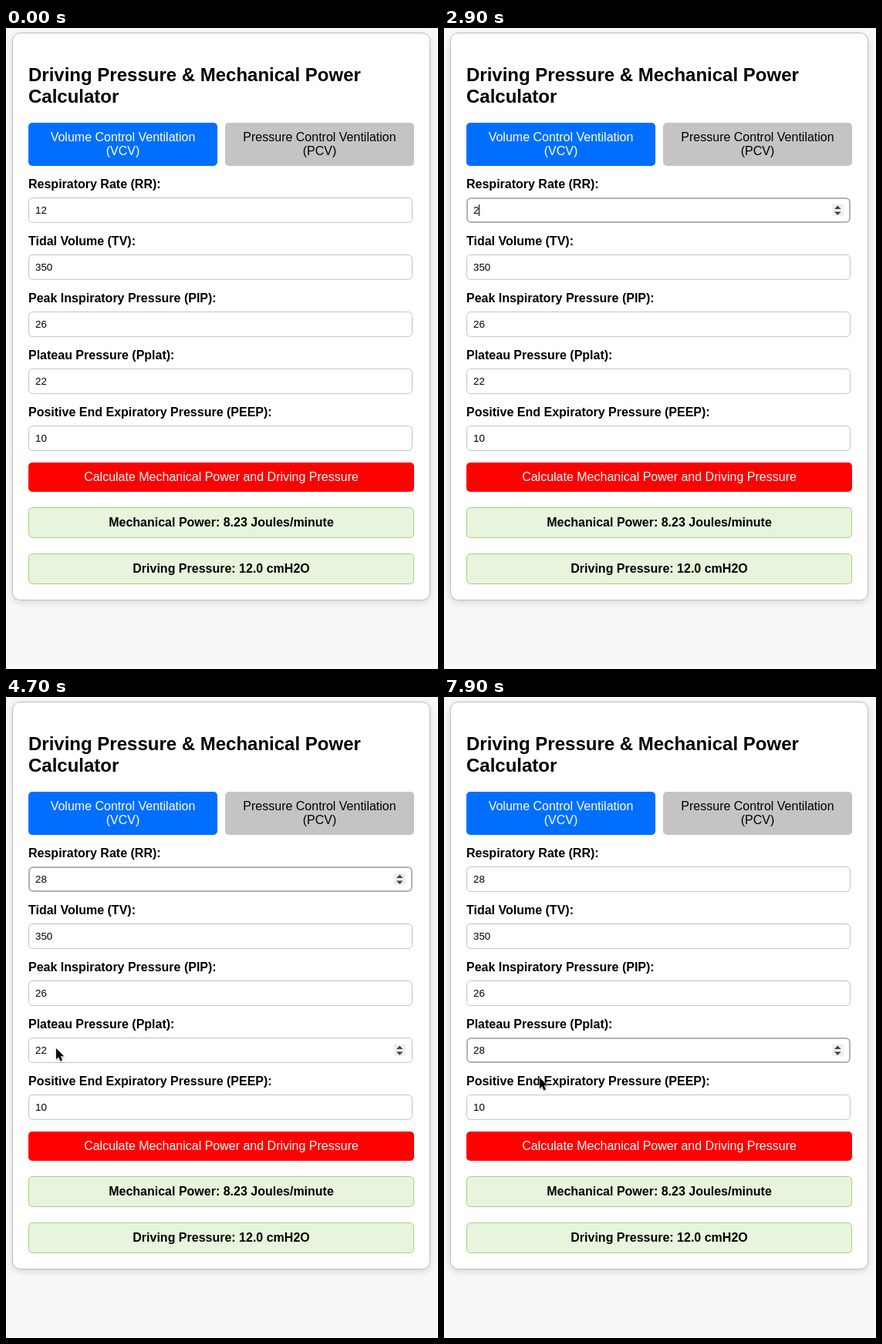
Write an HTML page that moves like this. It is 560 px wide and 832 px high and loops after 8000 ms.

```html
<!DOCTYPE html>
<html lang="en">
<head>
<meta charset="utf-8">
<title>Ventilation calculator</title>
<style>
html, body { margin: 0; width: 100%; height: 100%; overflow: hidden; background: #f8f8f8; }
svg { display: block; width: 560px; height: 832px; font: 16px "Liberation Sans", Arial, sans-serif; }
.card { fill: #fff; stroke: #bdbdbd; filter: drop-shadow(0 3px 4px rgba(0,0,0,.13)); }
.bold { font-weight: bold; }
.title { font-size: 24px; }
.mid { text-anchor: middle; }
.white { fill: #fff; }
.value { font-size: 13.333px; }
.box { fill: #fff; stroke: #c4c4c4; }
.result { fill: #e6f5dc; stroke: #a5cf85; }
.cursor { filter: drop-shadow(0 1px 1px rgba(0,0,0,.3)); }
</style>
</head>
<body>
<svg id="stage" viewBox="0 0 560 832"></svg>
<script>
const LOOP = 8000, STEP = 100;
const stage = document.getElementById('stage');

const text = (x, y, cls, s) => `<text x="${x}" y="${y}" class="${cls}">${s}</text>`;
const rect = (x, y, w, h, attrs) => `<rect x="${x}" y="${y}" width="${w}" height="${h}" rx="5" ${attrs}/>`;

const labels = [
  'Respiratory Rate (RR):', 'Tidal Volume (TV):', 'Peak Inspiratory Pressure (PIP):',
  'Plateau Pressure (Pplat):', 'Positive End Expiratory Pressure (PEEP):'
];
const initial = ['12', '350', '26', '22', '10'];
const RR = 0, PPLAT = 3;
const fieldTop = i => 220 + 74 * i;

// [time, field, value]: focusing and typing; each one restarts the caret blink
const edits = [
  [1500, RR, '12'], [1700, RR, '1'], [2500, RR, ''], [2800, RR, '2'], [3100, RR, '28'],
  [4900, PPLAT, '22'], [5200, PPLAT, '2'], [5400, PPLAT, ''], [5700, PPLAT, '2'], [5950, PPLAT, '28']
];

// Pointer paths: [time, x, y]; the pointer is hidden between paths
const paths = [
  [[1000, 18, 262], [1300, 66, 233], [1700, 66, 233]],
  [[4000, 66, 233], [4200, 66, 233], [4600, 65, 456], [5200, 65, 456]],
  [[7300, 65, 456], [7400, 65, 456], [7900, 124, 494], [8000, 124, 494]]
];

function pointerAt(t) {
  for (const path of paths)
    for (let i = 1; i < path.length; i++) {
      const [t0, x0, y0] = path[i - 1], [t1, x1, y1] = path[i];
      if (t < t0 || t >= t1) continue;
      const p = (t - t0) / (t1 - t0), e = p * p * (3 - 2 * p);
      return [x0 + (x1 - x0) * e, y0 + (y1 - y0) * e];
    }
  return null;
}

function field(i, value, focused, spinner, caret) {
  const y = fieldTop(i);
  let s = focused
    ? rect(30, y + 1, 496, 31, 'fill="#fff" stroke="#b2b2b2" stroke-width="2"')
    : rect(29.5, y + .5, 497, 32, 'class="box"');
  s += text(38, y + 21, 'value', value);
  if (spinner)
    s += `<rect x="503" y="${y + 9}" width="15" height="15" fill="#efefef"/>` +
      `<path d="M506 ${y + 15}l4.3-4.5 4.3 4.5zm0 3.5l4.3 4.5 4.3-4.5z" fill="#444"/>`;
  if (caret)
    s += `<rect x="${Math.round(38 + 7.415 * value.length)}" y="${y + 9}" width="1" height="15"/>`;
  return s;
}

stage.innerHTML =
  '<rect x="8.5" y="6.5" width="541" height="736" rx="10" class="card"/>' +
  text(29, 69, 'bold title', 'Driving Pressure &amp; Mechanical Power') +
  text(29, 97, 'bold title', 'Calculator') +
  rect(29, 123, 245, 56, 'fill="#006fff"') +
  text(151.5, 147, 'mid white', 'Volume Control Ventilation') +
  text(151.5, 165, 'mid white', '(VCV)') +
  rect(284, 123, 245, 56, 'fill="#c4c4c4"') +
  text(406.5, 147, 'mid', 'Pressure Control Ventilation') +
  text(406.5, 165, 'mid', '(PCV)') +
  labels.map((s, i) => text(29, fieldTop(i) - 12, 'bold', s)).join('') +
  rect(29, 564, 500, 38, 'fill="#f00"') +
  text(279, 588, 'mid white', 'Calculate Mechanical Power and Driving Pressure') +
  rect(29.5, 622.5, 499, 39, 'class="result"') +
  text(279, 647, 'mid bold', 'Mechanical Power: 8.23 Joules/minute') +
  rect(29.5, 682.5, 499, 39, 'class="result"') +
  text(279, 707, 'mid bold', 'Driving Pressure: 12.0 cmH2O') +
  '<g id="fields"></g>' +
  '<path id="pointer" class="cursor" d="M0 0V14.2L3.2 11.2 5.5 16.4 8 15.3 5.8 10.2H10.2Z" stroke="#fff" stroke-width="1.2" paint-order="stroke"/>';
const fields = document.getElementById('fields'), pointer = document.getElementById('pointer');

function draw(now) {
  const t = Math.floor(now % LOOP / STEP) * STEP;
  const values = [...initial];
  let focus = -1, last = 0;
  for (const [time, i, value] of edits)
    if (t >= time) { values[i] = value; focus = i; last = time; }
  const blink = (t - last) % 1000 < 500;
  const pos = pointerAt(t);
  fields.innerHTML = values.map((value, i) => {
    const y = fieldTop(i), on = i === focus;
    const hover = pos && pos[0] >= 29 && pos[1] >= y && pos[1] < y + 33;
    return field(i, value, on, on || hover, on && blink);
  }).join('');
  pointer.style.display = pos ? '' : 'none';
  if (pos) pointer.setAttribute('transform', `translate(${pos})`);
  requestAnimationFrame(() => draw(performance.now()));
}
draw(performance.now());
</script>
</body>
</html>
```
